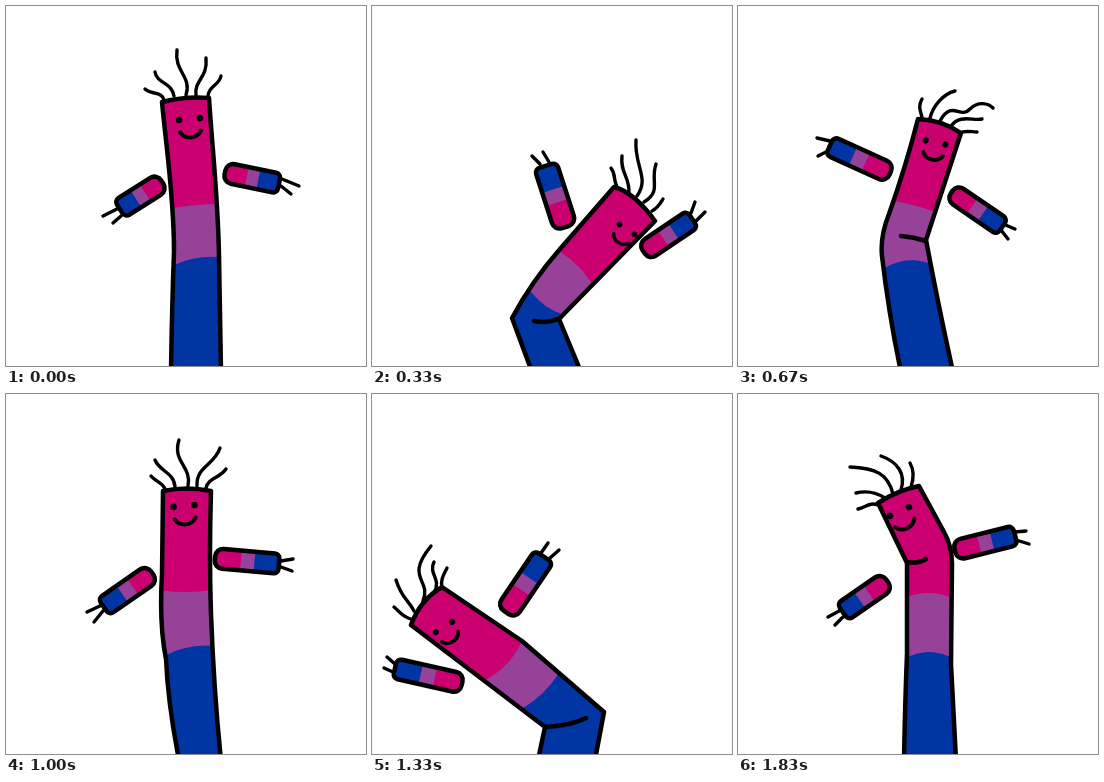
These frames come from a looping animation (360 by 360 pixels, 1.99 s). An HTML page with a canvas:

```html
<!DOCTYPE html>
<html lang="en">
<head>
<meta charset="utf-8">
<title>Waving tube dancer</title>
<style>
html, body { margin: 0; height: 100%; overflow: hidden; background: #fff; }
canvas { display: block; width: 100vw; height: 100vh; }
</style>
</head>
<body>
<canvas id="stage" width="360" height="360"></canvas>
<script>
const LOOP = 1990;
const PINK = '#ca0070', PURPLE = '#964298', BLUE = '#0135a3', INK = '#000';
const ctx = document.getElementById('stage').getContext('2d');

// body, crease, hair: paths; bands: left x,y, right x,y, bulge;
// face: x, y, degrees, scale; arms: shoulder x,y, hand x,y, width; fingers: path
const poses = [
  {
    body: 'M165 366Q166 300 168 245C168 190 160 140 156 96Q180 90 203 92C206 140 212 190 213 250Q214 310 215 366',
    bands: [[167, 202, 213, 198, 1], [168, 259, 214, 251, 3]],
    face: [183.5, 113, -5, 1],
    arms: [[158, 175, 112, 204, 20], [217, 166, 275, 178, 20]],
    fingers: 'M111 203L97 210M115 210L107 217M276 173L293 180M275 180L285 188',
    hair: 'M158 94C156 85 145 89 139 83M168 90C166 76 151 78 149 66M180 89C186 70 168 66 171 44M190 89C188 74 202 72 200 52M202 91C202 80 213 80 215 70'
  },
  {
    body: 'M164 366Q156 290 160 222C164 190 180 140 191 94Q214 92 236 102C228 140 208 195 207 230Q208 300 213 366',
    bands: [[164, 199, 212, 203, 1], [159, 261, 208, 256, 4]],
    face: [209, 119, 12, 1],
    arms: [[160, 170, 109, 184, 20], [237, 176, 293, 179, 20]],
    fingers: 'M109 180L96 181M110 187L99 193M293 176L306 177M293 182L304 188',
    hair: 'M194 92C196 84 184 80 183 72M203 92C204 76 194 74 196 60M214 93C222 74 208 66 213 45M224 95C228 80 238 78 238 60M233 99C236 90 245 90 249 82'
  },
  {
    body: 'M160 366L140 312Q160 275 188 243L242 181Q262 186 283 215L187 313L209 366',
    crease: 'M162 315Q175 318 188 312',
    bands: [[190, 247, 219, 276, 2], [160, 287, 192, 309, -3]],
    face: [255, 223.5, 33, .85],
    arms: [[194, 223, 173, 158, 23], [270, 247, 322, 212, 20]],
    fingers: 'M168 158L160 150M177 156L171 146M319 207L323 196M324 215L333 206',
    hair: 'M247 184C240 175 245 170 239 162M257 188C258 170 248 168 250 150M265 190C278 172 262 160 264 134M272 196C290 185 278 175 284 158M280 205C286 202 288 198 291 193'
  },
  {
    body: 'M161 366L142 276Q141 262 150 250L209 146Q234 149 251 169L189 272L212 366',
    crease: 'M163 272Q176 276 189 272',
    bands: [[170, 214, 211, 235, 1], [146, 274, 191, 280, 2]],
    face: [222, 173, 24, .95],
    arms: [[174, 193, 131, 151, 21], [241, 217, 289, 213, 20]],
    fingers: 'M129 150L119 145M136 148L129 138M289 209L299 204M290 216L300 217',
    hair: 'M211 145C206 138 210 132 207 125M220 146C218 132 226 124 228 115M230 149C236 130 246 138 252 118M240 156C250 142 256 150 266 136M248 164C256 158 260 160 266 155'
  },
  {
    body: 'M163 366Q151 310 144 250Q142 230 151 208Q168 160 180 113Q204 114 223 127L188 234Q200 298 215 366',
    crease: 'M163 230Q176 231 188 235',
    bands: [[156, 195, 197, 206, 1], [145, 263, 193, 258, 6]],
    face: [197.5, 136.5, 12, .95],
    arms: [[154, 168, 90, 139, 20], [212, 185, 266, 222, 19]],
    fingers: 'M92 135L79 132M90 145L80 150M265 218L277 223M263 224L270 233',
    hair: 'M184 111C182 104 180 100 184 93M192 112C195 100 205 88 217 85M202 115C214 93 222 114 232 103C240 95 250 97 255 102M213 120C222 108 235 115 244 113M221 127C228 124 233 126 239 126'
  },
  {
    body: 'M168 366Q154 300 150 232C152 190 163 150 167 104Q190 99 213 109C209 150 197 190 196 226Q200 300 215 366',
    bands: [[155, 196, 201, 201, 1], [152, 261, 200, 255, 5]],
    face: [187.5, 124, 4, 1],
    arms: [[149, 173, 85, 175, 20], [211, 175, 269, 196, 20]],
    fingers: 'M86 171L74 170M86 179L76 185M268 192L277 195M267 199L275 206',
    hair: 'M170 102C168 94 162 92 163 84M179 100C180 86 174 84 178 72M190 100C196 84 196 76 205 70M201 103C206 90 222 92 229 80M210 107C216 100 224 102 230 98'
  },
  {
    body: 'M173 366Q162 310 160 265Q153 230 156 180L157 97Q181 92 205 97Q203 160 205 220Q208 300 215 366',
    bands: [[154, 196, 206, 196, -2], [158, 262, 209, 252, 4]],
    face: [178, 112, -5, 1],
    arms: [[148, 178, 96, 214, 20], [207, 164, 275, 170, 20]],
    fingers: 'M96 211L81 218M97 217L88 228M275 167L287 165M275 173L286 177',
    hair: 'M159 95C156 88 150 88 145 82M169 93C168 78 154 78 149 66M182 92C186 72 166 68 173 46M191 92C190 72 208 72 214 54M200 94C202 84 214 84 220 75'
  },
  {
    body: 'M170 366L166 275Q164 262 157 250L102 143Q120 125 146 119L208 229Q217 244 217 262L219 366',
    crease: 'M166 266Q180 270 194 262',
    bands: [[144, 226, 187, 196, -1], [164, 270, 214, 247, 2]],
    face: [129, 147, -26, 1],
    arms: [[120, 224, 55, 243, 20], [183, 172, 242, 147, 21]],
    fingers: 'M55 239L41 242M57 247L47 255M240 143L249 136M244 149L254 147',
    hair: 'M103 141C96 136 90 140 83 136M109 135C102 124 92 126 84 114M121 127C122 106 100 100 99 78M131 122C136 104 122 90 124 67M142 119C142 108 150 104 150 94'
  },
  {
    body: 'M166 366L173 333L39 231Q48 206 70 193L150 247L232 318L223 366',
    crease: 'M173 333Q198 332 214 324',
    bands: [[115, 285, 149, 249, -4], [151, 314, 187, 279, -3]],
    face: [72, 233, -32, .92],
    arms: [[92, 290, 21, 274, 20], [133, 220, 173, 161, 22]],
    fingers: 'M23 270L15 263M21 278L12 274M169 159L176 149M178 164L187 156',
    hair: 'M41 226C30 222 30 220 22 213M42 217C36 205 30 205 24 186M51 207C60 185 32 185 59 152M62 199C70 185 56 180 62 168M70 194C68 186 72 180 75 174'
  },
  {
    body: 'M163 366L176 283L71 179Q82 154 108 147L215 260Q228 272 227 285L219 366',
    crease: 'M175 282Q194 288 208 283',
    bands: [[139, 247, 173, 215, -3], [173, 281, 205, 259, -5]],
    face: [103, 176.5, -34, .95],
    arms: [[120, 240, 56, 260, 19], [157, 187, 211, 148, 20]],
    fingers: 'M58 258L47 263M60 264L53 269M207 146L214 139M212 151L221 148',
    hair: 'M72 182C64 180 60 182 54 185M76 170C70 162 58 162 48 164M83 163C78 141 56 138 45 144Q36 148 26 147M91 156C90 140 78 130 62 127M103 148C103 138 98 132 94 126'
  },
  {
    body: 'M165 366L172 240Q172 230 167 223L106 146Q122 126 146 120L211 203Q219 214 219 230L218 366',
    crease: 'M171 229Q186 232 199 224',
    bands: [[158, 212, 196, 184, -1], [171, 270, 219, 266, 5]],
    face: [131, 148, -30, 1],
    arms: [[136, 213, 82, 239, 19], [186, 171, 245, 145, 20]],
    fingers: 'M81 236L69 241M84 243L76 250M243 142L252 136M246 148L256 147',
    hair: 'M107 147C99 144 94 148 86 150M112 138C104 130 94 131 82 132M120 131C114 112 98 108 73 110M129 126C130 112 118 102 104 99M140 121C141 112 138 104 133 96'
  },
  {
    body: 'M166 366Q167 310 169 260L169 169L140 109Q160 96 181 92L206 138Q214 152 214 170L213 270L218 366',
    crease: 'M169 168Q180 170 188 165',
    bands: [[166, 204, 215, 204, 5], [166, 265, 216, 265, 7]],
    face: [161.5, 117.5, -25, 1],
    arms: [[151, 186, 103, 219, 20], [215, 157, 279, 141, 20]],
    fingers: 'M103 216L90 223M105 223L97 231M277 138L288 137M278 146L291 150',
    hair: 'M140 111C132 108 128 113 120 115M147 104C136 97 126 97 118 99M155 100C150 80 138 74 112 73M163 96C168 80 160 68 143 62M173 93C176 84 176 76 172 69'
  }
];

function ink(path, width) {
  ctx.lineWidth = width;
  ctx.stroke(new Path2D(path));
}

// Fills everything on the base side of a bulging line across the tube.
function band([lx, ly, rx, ry, bulge], color) {
  const len = Math.hypot(rx - lx, ry - ly);
  const nx = (ly - ry) / len, ny = (rx - lx) / len;
  const ex = (rx - lx) / len * 60, ey = (ry - ly) / len * 60;
  ctx.beginPath();
  ctx.moveTo(lx - ex, ly - ey);
  ctx.lineTo(lx, ly);
  ctx.quadraticCurveTo((lx + rx) / 2 - nx * bulge * 2, (ly + ry) / 2 - ny * bulge * 2, rx, ry);
  ctx.lineTo(rx + ex, ry + ey);
  ctx.lineTo(rx + ex + nx * 400, ry + ey + ny * 400);
  ctx.lineTo(lx - ex + nx * 400, ly - ey + ny * 400);
  ctx.fillStyle = color;
  ctx.fill();
}

function drawBody({ body, bands, crease }) {
  const shape = new Path2D(body);
  ctx.save();
  ctx.clip(shape);
  ctx.fillStyle = PINK;
  ctx.fillRect(0, 0, 360, 360);
  band(bands[0], PURPLE);
  band(bands[1], BLUE);
  ctx.restore();
  ink(body, 4.5);
  if (crease) ink(crease, 4.5);
}

function drawArm([sx, sy, hx, hy, width]) {
  const len = Math.hypot(hx - sx, hy - sy), top = -width / 2;
  ctx.save();
  ctx.translate(sx, sy);
  ctx.rotate(Math.atan2(hy - sy, hx - sx));
  ctx.beginPath();
  ctx.roundRect(2, top, len - 4, width, [8, 5, 5, 8]);
  ctx.save();
  ctx.clip();
  [[0, PINK], [.41, PURPLE], [.61, BLUE]].forEach(([from, color]) => {
    ctx.fillStyle = color;
    ctx.fillRect(from * len, top, len, width);
  });
  ctx.restore();
  ctx.lineWidth = 4.5;
  ctx.stroke();
  ctx.restore();
}

function drawFace([x, y, degrees, scale]) {
  ctx.save();
  ctx.translate(x, y);
  ctx.rotate(degrees * Math.PI / 180);
  ctx.scale(scale, scale);
  ctx.fillStyle = INK;
  for (const side of [-10.5, 10.5]) {
    ctx.beginPath();
    ctx.arc(side, 0, 3.3, 0, 7);
    ctx.fill();
  }
  ink('M-10.5 12.5C-6 20.5 6 20.5 10.5 12.5', 4);
  ctx.restore();
}

function draw(pose) {
  ctx.fillStyle = '#fff';
  ctx.fillRect(0, 0, 360, 360);
  ctx.strokeStyle = INK;
  ctx.lineCap = ctx.lineJoin = 'round';
  ink(pose.hair + pose.fingers, 3.4);
  drawBody(pose);
  drawFace(pose.face);
  pose.arms.forEach(drawArm);
}

// Twelve held poses, six per second, each start rounded to 10 ms.
const startOf = i => Math.round(i * 50 / 3) * 10;
let start;
function tick(now) {
  start ??= now;
  const t = (now - start) % LOOP;
  draw(poses.findLast((_, i) => startOf(i) <= t));
  requestAnimationFrame(tick);
}
draw(poses[0]);
requestAnimationFrame(tick);
</script>
</body>
</html>
```
